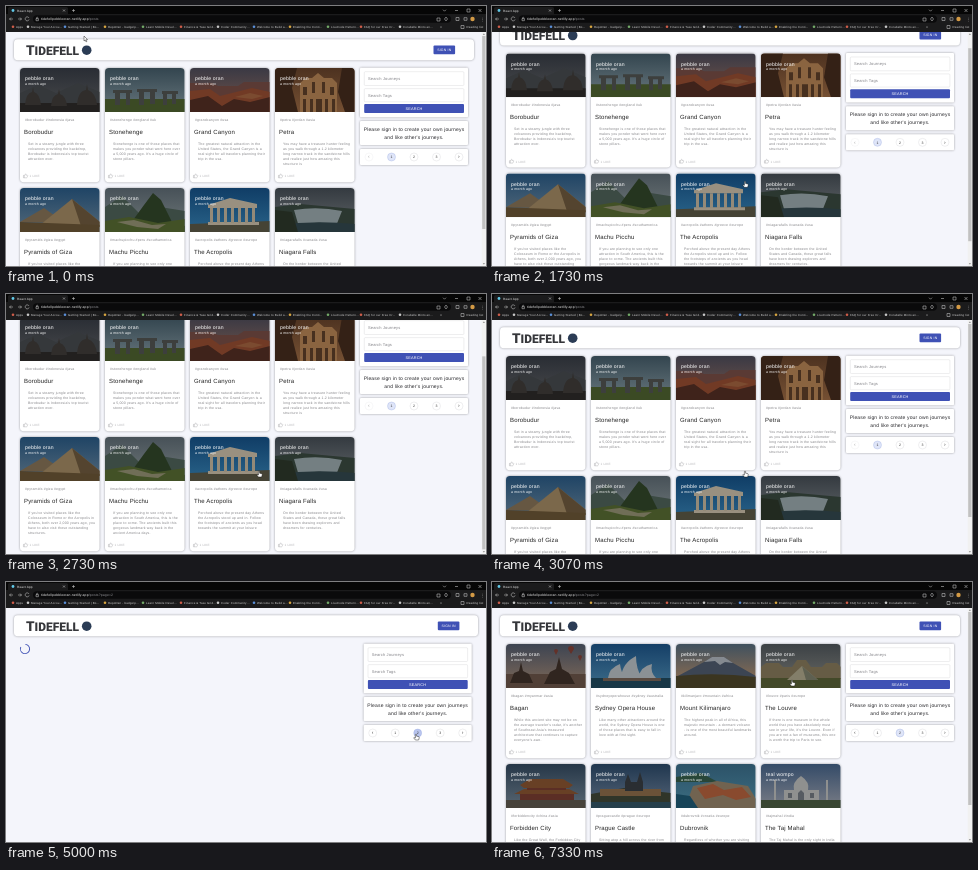
Recreate the animation shown at these times as an HTML page. Size 480x260 px, loop 8000 ms.

```html
<!DOCTYPE html>
<html lang="en">
<head>
<meta charset="utf-8">
<title>React App</title>
<style>
html, body { margin: 0; width: 100%; height: 100%; overflow: hidden; background: #f4f5fb; }
svg { display: block; width: 480px; height: 260px; font-family: "Liberation Sans", Arial, sans-serif; letter-spacing: .01em; text-rendering: geometricPrecision; }
.paper { fill: #fff; filter: drop-shadow(0 .7px .9px rgba(0,0,0,.36)); }
.brand { font-family: Roboto, "Liberation Sans", sans-serif; font-weight: 800; letter-spacing: 0; }
.mid { text-anchor: middle; }
.line { fill: none; stroke: #c4c4c8; stroke-width: .3; }
.thumb { fill: none; stroke: #a0a0a4; stroke-width: 1.8; }
.icon { fill: none; stroke: #c8c8c8; stroke-width: .55; }
</style>
</head>
<body>
<svg id="stage" viewBox="0 0 480 260"></svg>
<script>
const LOOP = 8000, CLICK = 4190, LOADED = 5330, BOTTOM = 39;
const BLUE = '#3f51b5';
const USER = 'pebble oran';

// Each card: title, tags, message lines, sky colours, flat shapes in an 80 x 44 picture.
const pages = [[
  { title: 'Borobudur', tags: '#borobudur #indonesia #java',
    text: "Set in a steamy jungle with three|volcanoes providing the backdrop,|Borobudur is Indonesia's top tourist|attraction ever.",
    sky: ['#292d34', '#4a4b4d'],
    art: [['#35383b', 'M0 25L18 17L36 25L58 15L80 24V44H0Z'], ['#22201f', 'M0 35H80V44H0Z'],
      ['#302d2b', 'M5 37Q6 25 12 24L13 19L14 24Q20 26 21 37ZM31 38Q32 27 38 26L39 21L40 26Q46 28 47 38ZM57 37Q58 23 66 22L67 16L68 22Q76 25 77 37Z']] },
  { title: 'Stonehenge', tags: '#stonehenge #england #uk',
    text: "Stonehenge is one of those places that|makes you ponder what went here over|a 5,000 years ago. It's a huge circle of|stone pillars.",
    sky: ['#33454f', '#68777d'],
    art: [['#3b4a24', 'M0 31H80V44H0Z'],
      ['#3d3f3d', 'M8 22H27V25H25V37H21V25H15V37H10V25H8ZM32 21H52V24H50V36H45V24H39V37H34V24H32ZM57 23H73V26H71V36H67V26H62V37H58V26H57Z']] },
  { title: 'Grand Canyon', tags: '#grandcanyon #usa',
    text: 'The greatest natural attraction in the|United States, the Grand Canyon is a|real sight for all travelers planning their|trip in the usa.',
    sky: ['#3a3944', '#75564a'],
    art: [['#5a3a34', 'M0 15H22L28 18H48L54 14H80V44H0Z'], ['#713a25', 'M0 23L20 21L30 28L46 24L62 20L80 24V44H0Z'],
      ['#3f231b', 'M0 32L18 28L32 38L44 31L60 34L80 29V44H0Z'], ['#7b4b30', 'M45 29L60 25L73 28L62 31Z']] },
  { title: 'Petra', tags: '#petra #jordan #asia',
    text: 'You may have a treasure hunter feeling|as you walk through a 1.2 kilometer|long narrow track in the sandstone hills|and realize just how amazing this|structure is',
    sky: ['#4d3220', '#755033'],
    art: [['#342116', 'M0 0H22L17 20L23 44H0ZM67 0H80V44H70L63 24Z'], ['#8a6440', 'M25 15L31 10H37L43 5L49 10H57L62 15V44H25Z'],
      ['#47301f', 'M28 19H32V27H28ZM37 14H40V25H37ZM47 14H50V25H47ZM55 19H59V27H55ZM28 31H31V44H28ZM35 31H38V44H35ZM41 31H47V44H41ZM50 31H53V44H50ZM57 31H60V44H57Z']] },
  { title: 'Pyramids of Giza', tags: '#pyramids #giza #egypt',
    text: "If you've visited places like the|Colosseum in Rome or the Acropolis in|Athens, both over 2,000 years ago, you|have to also visit these outstanding|structures.",
    sky: ['#1f4465', '#53697a'],
    art: [['#665742', 'M0 34L24 20L45 35Z'], ['#7b684b', 'M20 37L52 11L80 34V39Z'], ['#54442f', 'M52 11L80 34V39L61 38Z'], ['#514129', 'M0 34L80 37V44H0Z']] },
  { title: 'Machu Picchu', tags: '#machupicchu #peru #southamerica',
    text: 'If you are planning to see only one|attraction in South America, this is the|place to come. The ancients built this|gorgeous landmark way back in the|ancient America days.',
    sky: ['#475158', '#70797a'],
    art: [['#3b4a43', 'M0 19L17 8L34 25L49 18L80 23V44H0Z'], ['#25351f', 'M23 39L39 17L48 5L56 12L67 34L80 38V44H20Z'],
      ['#425126', 'M0 33L24 29L53 35L80 31V44H0Z'], ['#706e57', 'M12 34L29 32L47 37L61 36L53 41L32 39Z']] },
  { title: 'The Acropolis', tags: '#acropolis #athens #greece #europe',
    text: 'Perched above the present day Athens|the Acropolis stood up and in. Follow|the footsteps of ancients as you head|towards the summit at your leisure',
    sky: ['#103d66', '#296389'],
    art: [['#454335', 'M0 36L80 33V44H0Z'], ['#999080', 'M18 17L40 10L67 16V20H18ZM18 34H69V37H18Z'],
      ['#948a78', 'M20 20H23V35H20ZM27 20H30V35H27ZM34 20H37V35H34ZM41 20H44V35H41ZM48 20H51V35H48ZM55 20H58V35H55ZM62 20H65V35H62Z']] },
  { title: 'Niagara Falls', tags: '#niagarafalls #canada #usa',
    text: 'On the border between the United|States and Canada, these great falls|have been drawing explorers and|dreamers for centuries.',
    sky: ['#343a40', '#62676a'],
    art: [['#2b3730', 'M0 19L25 16L80 21V44H0Z'], ['#747f82', 'M19 22Q43 18 67 23L61 38Q43 31 24 39Z'], ['#26363b', 'M0 37Q42 32 80 36V44H0Z'], ['#222a20', 'M0 22L17 24L23 44H0Z']] }
], [
  { title: 'Bagan', tags: '#bagan #myanmar #asia',
    text: "While this ancient site may not be on|the average traveler's radar, it's another|of Southeast Asia's treasured|architecture that continues to capture|everyone's awe.",
    sky: ['#3d4452', '#806a58'],
    art: [['#514037', 'M0 30H80V44H0Z'], ['#30251f', 'M4 39L8 29L13 27L15 18L17 27L23 30L27 39ZM38 40L44 28L50 25L53 13L56 25L63 29L69 40Z'],
      ['#633129', 'M62 5a3 3 0 1 1 6 0L65 10ZM72 13a2 2 0 1 1 4 0L74 17ZM48 7a2 2 0 1 1 4 0L50 11Z']] },
  { title: 'Sydney Opera House', tags: '#sydneyoperahouse #sydney #australia',
    text: 'Like many other attractions around the|world, the Sydney Opera House is one|of those places that is easy to fall in|love with at first sight.',
    sky: ['#153f67', '#3d6d8a'],
    art: [['#183746', 'M0 34H80V44H0Z'], ['#8b9195', 'M17 34Q18 24 29 20Q30 28 34 34ZM30 34Q31 19 45 12Q45 25 51 34ZM47 34Q50 22 61 20Q59 28 65 34Z'], ['#594a40', 'M12 34H70V37H12Z']] },
  { title: 'Mount Kilimanjaro', tags: '#kilimanjaro #mountain #africa',
    text: 'The highest peak in all of Africa, this|majestic mountain - a dormant volcano|- is one of the most beautiful landmarks|around.',
    sky: ['#40515f', '#96704e'],
    art: [['#3c4553', 'M0 33L28 18L36 13H48L57 19L80 32V44H0Z'], ['#858a90', 'M28 18L36 13H48L57 19L49 18L44 21L39 17Z'], ['#3b3520', 'M0 32Q40 28 80 33V44H0Z']] },
  { title: 'The Louvre', tags: '#louvre #paris #europe',
    text: "If there is one museum in the whole|world that you have absolutely must|see in your life, it's the Louvre. Even if|you are not a fan of museums, this one|is worth the trip to Paris to see.",
    sky: ['#3c4145', '#6b6c67'],
    art: [['#665c45', 'M0 23L5 19H18L22 23H31L36 16H45L50 23H61L65 19H76L80 23V35H0Z'], ['#434929', 'M0 34H80V44H0Z'], ['#837e69', 'M26 36L41 22L57 36Z'], ['#5e6051', 'M41 22L57 36H45Z']] },
  { title: 'Forbidden City', tags: '#forbiddencity #china #asia',
    text: 'Like the Great Wall, the Forbidden City',
    sky: ['#263748', '#586672'],
    art: [['#684025', 'M14 21L24 15H57L67 21L63 24H18ZM8 30L18 25H63L73 30Z'], ['#5b2e25', 'M21 24H60V26H21ZM14 30H68V36H14Z'], ['#47433b', 'M0 36H80V44H0Z']] },
  { title: 'Prague Castle', tags: '#praguecastle #prague #europe',
    text: 'Sitting atop a hill across the river from',
    sky: ['#20374f', '#576679'],
    art: [['#303529', 'M0 30L33 24L80 29V44H0Z'], ['#6b5238', 'M9 25H70V32H9Z'], ['#2a2e32', 'M34 27V18L37 10L40 18H46L49 8L52 18V27Z'], ['#263f4b', 'M0 38H80V44H0Z']] },
  { title: 'Dubrovnik', tags: '#dubrovnik #croatia #europe',
    text: 'Regardless of whether you are visiting',
    sky: ['#2c5268', '#3c6e82'],
    art: [['#284638', 'M0 13L25 9L42 18H0Z'], ['#716350', 'M17 22L41 17L72 22L80 35V44H9Z'], ['#894a2e', 'M21 24L37 20L48 26L66 23L75 33L60 36L47 31L29 35Z'], ['#174458', 'M0 30L14 32L22 44H0Z']] },
  { title: 'The Taj Mahal', tags: '#tajmahal #india', user: 'teal wompo',
    text: 'The Taj Mahal is the only sight in India',
    sky: ['#344b68', '#7a7d86'],
    art: [['#8f908f', 'M23 26H33Q31 18 40 12Q49 18 47 26H58V36H23ZM13 16H15V36H13ZM65 16H67V36H65Z'], ['#565b61', 'M37 36V29L40 26L43 29V36ZM27 29H31V34H27ZM49 29H53V34H49Z'], ['#394632', 'M0 36H80V44H0Z']] }
]];

const bookmarks = [[10, 'Apps'], [25, 'Manage Your Accou…'], [62, 'Getting Started | Bo…'], [102, 'RepoDen - badge/p…'],
  [140, 'Learn Mobile Devel…'], [178, 'Finance &amp; Taxe Grid…'], [215, 'Coder Community…'], [251, 'Welcome to Build a…'],
  [287, 'Enabling the Conti…'], [325, 'LiveCode Pattern…'], [358, 'FAQ for our Free Cr…'], [397, 'Corabelle Minto an…']];
const tints = ['#cf5d4a', '#c8c8c8', '#5a8fd8', '#d8a640', '#73aa68'];

const text = (x, y, size, fill, s, extra = '') => `<text x="${x}" y="${y}" font-size="${size}" fill="${fill}" ${extra}>${s}</text>`;
const rect = (x, y, w, h, extra = '') => `<rect x="${x}" y="${y}" width="${w}" height="${h}" ${extra}/>`;
const path = (fill, d) => `<path fill="${fill}" d="${d}"/>`;
const icon = d => `<path class="icon" d="${d}"/>`;

function card(c, i, page) {
  const x = 14 + (i % 4) * 85, y = 62 + (i >> 2) * 120, id = `sky${page}${i}`;
  const lines = c.text.split('|').map((s, n) => text(8, 76.5 + n * 5, 3.5, '#858589', s)).join('');
  return `<g transform="translate(${x} ${y})">
    <linearGradient id="${id}" x2="0" y2="1"><stop stop-color="${c.sky[0]}"/><stop offset="1" stop-color="${c.sky[1]}"/></linearGradient>
    ${rect(0, 0, 79.5, 114.2, 'rx="3.75" class="paper"')}
    <g clip-path="url(#photo)">${rect(0, 0, 80, 44, `fill="url(#${id})"`)}${c.art.map(a => path(...a)).join('')}</g>
    ${text(5, 12.4, 5.1, '#fff', c.user || USER)}${text(5, 17, 3.5, '#fff', 'a month ago')}
    ${text(5, 52.8, 3.5, '#858589', c.tags)}${text(4, 65.5, 6, '#222', c.title)}${lines}
    <path class="thumb" transform="translate(3 105.2) scale(.22)" d="M2 10H6V21H2ZM6 11L12 3L14 5L13 9H20L22 11L18 20L16 21H6"/>
    ${text(9.5, 109.3, 3.1, '#b2b2b6', '1 LIKE')}</g>`;
}

const dots = ['‹', '1', '2', '3', '›'].map((s, i) =>
  `<g class="dot"><circle cx="${363 + i * 22.5}" cy="151" r="4" stroke-width=".3"/>${text(363 + i * 22.5, 152.3, i % 4 ? 3.5 : 5, '#333', s, 'class="mid"')}</g>`).join('');

const sidebar = `<g id="side">
  ${rect(354, 61.7, 108, 49.5, 'rx="1" class="paper"')}
  ${rect(358.3, 65.7, 99.6, 13.8, 'rx="1" class="line"')}${rect(358.3, 82.6, 99.6, 13.2, 'rx="1" class="line"')}
  ${text(362, 74, 4, '#808086', 'Search Journeys')}${text(362, 90.8, 4, '#808086', 'Search Tags')}
  ${rect(358.2, 98, 99.8, 9, `rx="1" fill="${BLUE}"`)}${text(408, 103.9, 3.9, '#fff', 'SEARCH', 'class="mid"')}
  ${rect(354, 115, 108, 24, 'rx="1" class="paper"')}
  ${text(408, 124.9, 5, '#28282c', 'Please sign in to create your own journeys', 'class="mid"')}
  ${text(408, 132.8, 5, '#28282c', "and like other's journeys.", 'class="mid"')}
  ${rect(354, 143, 108, 16, 'rx="1" class="paper"')}${dots}</g>`;

const chrome = `${rect(0, 0, 480, 26, 'fill="#1b1b1c"')}${rect(0, 0, 480, 8, 'fill="#060606"')}
  ${rect(2, 1, 60, 8, 'rx="1.5" fill="#1b1b1c"')}<circle cx="7" cy="4.5" r="1.4" fill="#61c9e8"/>
  ${text(11, 5.7, 3.1, '#eee', 'React App')}
  ${icon('M57 3.5l2 2m0-2l-2 2M66 4.5h3m-1.5-1.5v3M437 3.7l1.5 1.5l1.5-1.5M449 4.5h3M461 3h3v3h-3ZM472.5 3l3 3m0-3l-3 3')}
  ${rect(27, 9.3, 418, 7.4, 'rx="3.7" fill="#0a0a0b"')}
  ${icon('M7 13H3.5l1.5-1.5M3.5 13l1.5 1.5M12 13h3.5l-1.5-1.5M15.5 13l-1.5 1.5M23 12a2 2 0 1 0 .1 1.5M30 12.7h2.4v2H30ZM30.5 12.7v-1q.7-1 1.4 0v1M431 12h3v3h-3ZM438.5 13l1.5-2l1.5 2l-1.5 2ZM450 11.5h3v3h-3ZM458 11.7h3v2.6h-3Z')}
  <circle cx="466.5" cy="13" r="2.2" fill="#d39a45"/>${text(474, 14.6, 4.5, '#ccc', '⋮')}
  <text y="14.2" x="35" font-size="3.4" fill="#eee">tidefellpebbleoran.netlify.app<tspan id="route" fill="#96969a"></tspan></text>
  ${bookmarks.map(([x, s], i) => `<circle cx="${x - 3}" cy="20.8" r="1.3" fill="${tints[i % 5]}"/>${text(x, 21.9, 2.9, '#d5d5d5', s)}`).join('')}
  ${text(434, 22, 3.5, '#ccc', '»')}${icon('M455 19.5h3v3h-3Z')}${text(460.5, 21.9, 2.9, '#d5d5d5', 'Reading list')}`;

const stage = document.getElementById('stage');
stage.innerHTML = `<clipPath id="photo"><path d="M0 44V3.75Q0 0 3.75 0H75.75Q79.5 0 79.5 3.75V44Z"/></clipPath>
  ${rect(0, 0, 480, 260, 'fill="#f4f5fb"')}
  <g id="page">
    ${rect(8, 33.2, 460, 21, 'id="bar" rx="3.75" class="paper"')}
    <text class="brand" x="20" y="48.9" font-size="13.6" fill="#35363a">T<tspan font-size="12">IDEFELL</tspan></text>
    <circle cx="80.7" cy="44.2" r="4.8" fill="#2b3c55"/>
    <g id="sign">${rect(427.5, 39.4, 21.6, 8.8, `rx="1" fill="${BLUE}"`)}${text(438.3, 45.1, 3.5, '#fff', 'SIGN IN', 'class="mid"')}</g>
    ${pages.map((p, n) => `<g class="cards">${p.map((c, i) => card(c, i, n)).join('')}</g>`).join('')}
    <circle id="spin" cx="19" cy="67" r="4.6" fill="none" stroke="${BLUE}" stroke-width=".9"/>
    ${sidebar}
  </g>
  <g id="scroll">${rect(475.7, 26, 4.3, 234, 'fill="#f1f1f1"')}${rect(476.2, 30, 3.3, 193, 'id="grip" fill="#c1c1c1"')}
    ${path('#777', 'M476.8 28.7L477.9 27.5L479 28.7ZM476.8 257.3L477.9 258.5L479 257.3Z')}</g>
  ${chrome}
  <g id="pointer" stroke="#111" stroke-width=".45" fill="#fff">
    <path id="arrow" d="M0 0V5L1.2 4L2 5.9L2.8 5.5L2 3.7H3.6Z"/>
    <path id="hand" d="M-.6 .4Q0 -.4 .6 .4V2.2L2.9 2.7Q3.4 3 3.2 4L2.6 6H-.6L-2.3 3.8Q-2 3 -.6 4Z"/>
  </g>`;

const $ = id => document.getElementById(id);
const show = (el, on) => el.setAttribute('display', on ? 'inline' : 'none');
const move = (el, x, y) => el.setAttribute('transform', `translate(${x} ${y})`);
const groups = stage.querySelectorAll('.cards'), dotEls = stage.querySelectorAll('.dot');

const clamp = v => Math.min(1, Math.max(0, v));
const smooth = (t, a, b) => { const p = clamp((t - a) / (b - a)); return p * p * (3 - 2 * p); };

// time, x, y
const trail = [[0, 78, 30], [70, 78, 30], [270, 104, 125], [470, 168, 212], [730, 240, 156], [1050, 240, 156],
  [1550, 253, 175], [2700, 253, 177], [3470, 253, 177], [3750, 330, 172], [4050, 410, 152], [6680, 410, 152],
  [6830, 285, 208], [6960, 120, 218], [7070, 52, 145], [7180, 145, 76], [7330, 300, 98], [8000, 300, 98]];

function pointerAt(t) {
  const i = trail.findIndex(k => k[0] > t), a = trail[i - 1], b = trail[i];
  const p = (t - a[0]) / (b[0] - a[0]);
  return [a[1] + (b[1] - a[1]) * p, a[2] + (b[2] - a[2]) * p];
}

function spin(t) {
  const p = (t / 1400) % 1, grow = smooth(p, 0, .5), slide = smooth(p, .5, 1);
  const unit = 4.6 / 20.2;
  $('spin').setAttribute('stroke-dasharray', `${(1 + 99 * grow) * unit} ${200 * unit}`);
  $('spin').setAttribute('stroke-dashoffset', -(15 * grow + 110 * slide) * unit);
  $('spin').setAttribute('transform', `rotate(${p * 360} 19 67)`);
}

function draw(t) {
  const loading = t >= CLICK && t < LOADED, current = t < CLICK ? 1 : 2;
  const scroll = BOTTOM * (smooth(t, 1610, 1900) - smooth(t, 2800, 3050));
  const [x, y] = pointerAt(t);

  move($('page'), 0, -scroll);
  move($('side'), loading ? 3.7 : 0, 0);
  move($('sign'), loading ? 4.3 : 0, 0);
  $('bar').setAttribute('width', loading ? 464 : 460);
  show($('scroll'), !loading);
  move($('grip'), 0, scroll * .83);
  groups.forEach((g, i) => show(g, !loading && i === current - 1));
  show($('spin'), loading);
  spin(Math.max(0, t - CLICK));
  $('route').textContent = current === 1 ? '/posts' : '/posts?page=2';

  dotEls.forEach((d, i) => {
    const on = i === current, ring = d.firstChild;
    const hover = on && x > 400 && y > 140 && y < 160;
    ring.setAttribute('fill', on ? (hover ? '#b9c5ee' : '#dfe5f8') : '#fff');
    ring.setAttribute('stroke', on ? '#8d9fdc' : '#c8c8cc');
    d.setAttribute('opacity', i === 0 && current === 1 ? .45 : 1);
  });

  move($('pointer'), x, y);
  show($('arrow'), y < 60);
  show($('hand'), y >= 60);
}

function tick() {
  draw(performance.now() % LOOP);
  requestAnimationFrame(tick);
}
tick();
</script>
</body>
</html>
```
